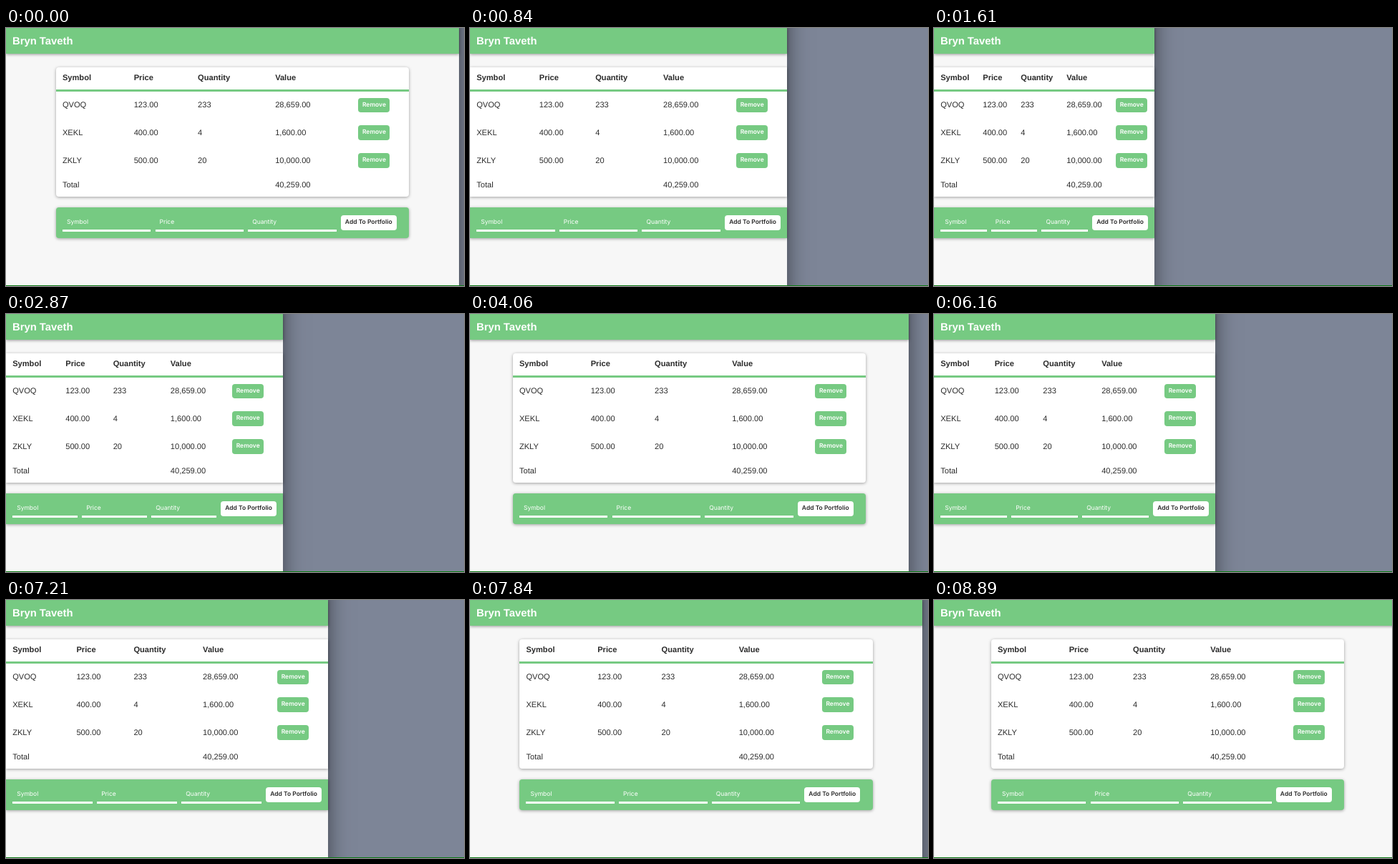
Recreate the animation shown at these times as an HTML page. Size 640 by 361 pixels, loop 8.96 s.

```html
<!DOCTYPE html>
<html lang="en">
<head>
<meta charset="utf-8">
<title>Responsive portfolio</title>
<style>
  * { box-sizing: border-box; }
  html, body { margin: 0; width: 100%; height: 100%; overflow: hidden; }
  body {
    position: relative;
    background: #7d8597;
    color: #2b2b2b;
    font: 11.1px/1 "Liberation Sans", Arial, sans-serif;
    text-rendering: geometricPrecision;
    --green: #76ca82;
  }
  .page {
    position: absolute;
    left: 0;
    top: -40px;
    width: var(--w);
    height: 460px;
    padding-top: 40px;
    background: #f7f7f7;
    box-shadow: 0 0 28px rgba(0, 0, 0, .5);
  }
  header {
    height: 36.4px;
    padding: 11.9px 9px 0;
    background: var(--green);
    color: #fff;
    font-size: 14.8px;
    font-weight: bold;
    white-space: nowrap;
    box-shadow: 0 1px 4px rgba(0, 0, 0, .4);
  }
  .card {
    position: absolute;
    left: calc((var(--w) - min(var(--w), 493.5px)) / 2);
    width: min(var(--w), 493.5px);
    border-radius: clamp(0px, (var(--w) - 493.5px) * 9, 4px);
    box-shadow: 0 1px 4px rgba(0, 0, 0, .36);
    overflow: hidden;
    white-space: nowrap;
  }
  .table { top: 94.5px; height: 181.7px; background: #fff; }
  .row {
    display: grid;
    grid-template-columns:
      minmax(0, 241fr) minmax(0, 216fr) minmax(0, 261fr) minmax(0, 281fr)
      clamp(63px, 100% - 246px, 80px);
    align-items: center;
    height: 38.75px;
  }
  .row > * { margin-left: 9.2px; }
  .row > span { position: relative; top: .8px; }
  .head { height: 34.1px; border-bottom: 3px solid var(--green); font-weight: bold; }
  .total { height: 29.2px; }
  .button, .field { font: 8.5px/1 Inter, "Liberation Sans", sans-serif; }
  .button {
    height: 20.6px;
    border-radius: 4px;
    font-weight: 600;
    line-height: 21px;
    text-align: center;
  }
  .remove { width: 44px; background: var(--green); color: #fff; }
  .form { top: 290.6px; height: 43.8px; background: var(--green); }
  .form > * { position: absolute; top: 11.6px; }
  .field {
    --size: min(123.5px, (var(--w) - 114.4px) / 3);
    left: calc(9.2px + var(--i) * (var(--size) + 6.1px));
    width: var(--size);
    height: 23px;
    padding: 5.4px 6px 0;
    border-bottom: 3px solid #fff;
    color: #fff;
  }
  .add {
    left: calc(27.5px + 3 * min(123.5px, (var(--w) - 114.4px) / 3));
    width: 78px;
    background: #fff;
    color: #2b2b2b;
  }
  .base { position: fixed; left: 0; bottom: 0; width: 100%; height: 1px; background: #0b7a14; }
</style>
</head>
<body style="--w: 633px">
  <div class="page">
    <header>Bryn Taveth</header>
    <div class="card table">
      <div class="row head"><span>Symbol</span><span>Price</span><span>Quantity</span><span>Value</span></div>
      <div class="row"><span>QVOQ</span><span>123.00</span><span>233</span><span>28,659.00</span><div class="button remove">Remove</div></div>
      <div class="row"><span>XEKL</span><span>400.00</span><span>4</span><span>1,600.00</span><div class="button remove">Remove</div></div>
      <div class="row"><span>ZKLY</span><span>500.00</span><span>20</span><span>10,000.00</span><div class="button remove">Remove</div></div>
      <div class="row total"><span>Total</span><span></span><span></span><span>40,259.00</span></div>
    </div>
    <div class="card form">
      <div class="field" style="--i: 0">Symbol</div>
      <div class="field" style="--i: 1">Price</div>
      <div class="field" style="--i: 2">Quantity</div>
      <div class="button add">Add To Portfolio</div>
    </div>
  </div>
  <div class="base"></div>
<script>
  const LOOP = 8960;
  const STEP = 70;
  // [time in ms, page width in px]
  const widths = [
    [0, 633], [910, 427], [1610, 308], [2380, 308], [2870, 387], [3290, 487],
    [4060, 613], [4200, 635], [4270, 637], [4340, 637], [5250, 472], [6160, 393],
    [6510, 330], [6720, 310], [6860, 330], [7070, 394], [7210, 450], [7420, 530],
    [7700, 615], [7980, 648], [8120, 653], [LOOP, 653]
  ];

  function widthAt(time) {
    const i = widths.findIndex(([end]) => end > time);
    const [t0, w0] = widths[i - 1];
    const [t1, w1] = widths[i];
    return w0 + (w1 - w0) * (time - t0) / (t1 - t0);
  }

  const start = performance.now();
  function draw() {
    const time = (performance.now() - start) % LOOP;
    const stepped = Math.floor(time / STEP) * STEP;
    document.body.style.setProperty("--w", Math.round(widthAt(stepped)) + "px");
    requestAnimationFrame(draw);
  }
  draw();
</script>
</body>
</html>
```
